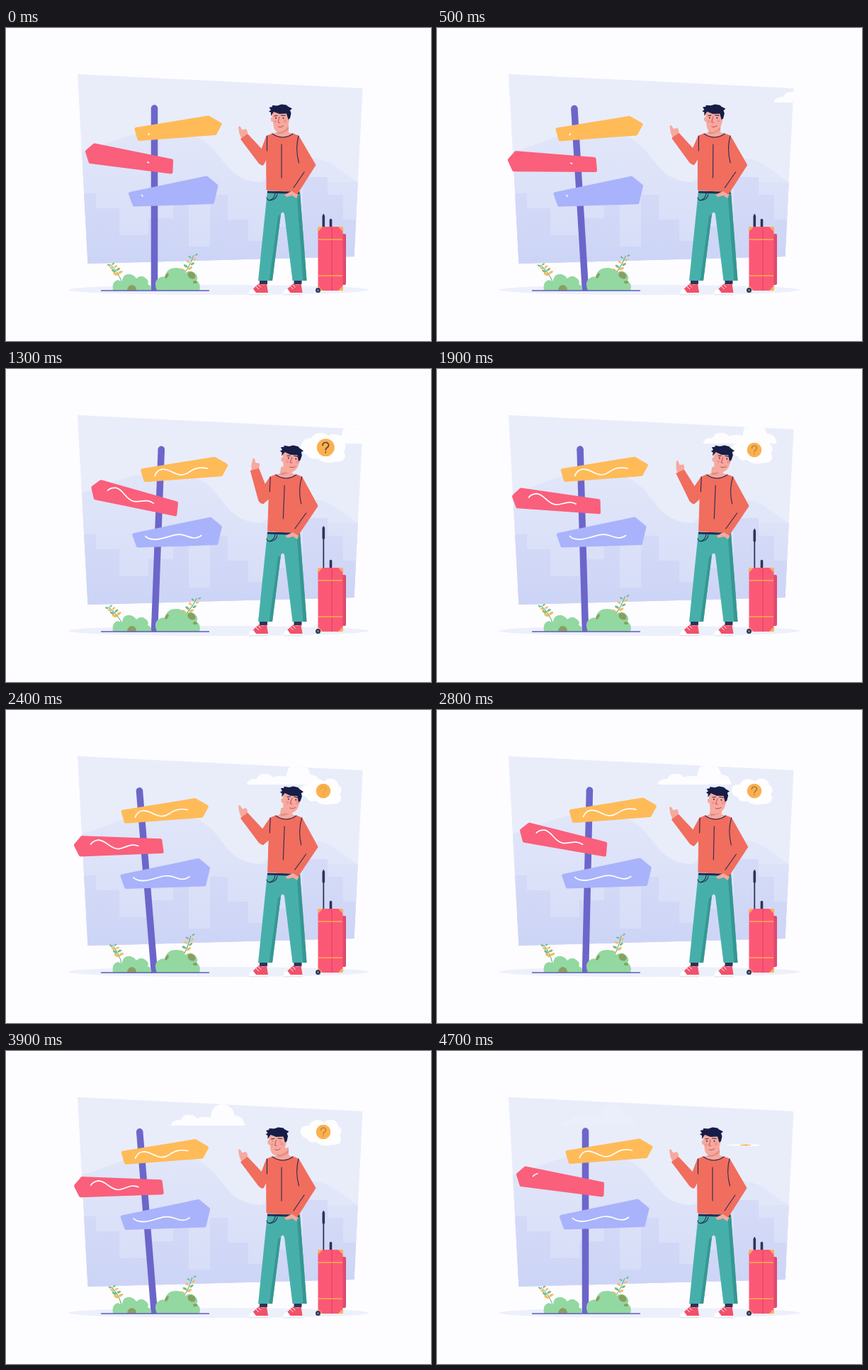
Animation of 600 by 441 pixels, one loop 4800 ms. Source, as an HTML page:

```html
<!DOCTYPE html>
<html lang="en">
<head>
<meta charset="utf-8">
<title>Traveller at a signpost</title>
<style>
  html, body { margin: 0; width: 100%; height: 100%; overflow: hidden; background: #fdfcff; }
  svg { display: block; width: 600px; height: 441px; }
  .line { fill: none; stroke: #252b54; stroke-width: 1.1; stroke-linecap: round; }
  .sign path:first-child { stroke-width: 5; stroke-linejoin: round; }
  .wave { fill: none; stroke: #fff; stroke-width: 1.7; }
  .stem { fill: none; stroke: #59a579; stroke-width: 1; }
  .skin { fill: #f6a99e; }
  .shirt { fill: #f16d5e; stroke: #f16d5e; stroke-linejoin: round; }
</style>
</head>
<body>
<svg viewBox="0 0 600 441">
  <defs>
    <clipPath id="frame"><path d="M101 65L503.500 85L491.500 322L115.500 332Z"/></clipPath>
    <linearGradient id="hill" x1="0" y1="0" x2="0" y2="1">
      <stop stop-color="#e1e6f9"/><stop offset="1" stop-color="#d5dcf7"/>
    </linearGradient>
    <linearGradient id="town" x1="0" y1="0" x2="0" y2="1">
      <stop stop-color="#d5dbf7"/><stop offset="1" stop-color="#ccd4f6"/>
    </linearGradient>
  </defs>

  <g clip-path="url(#frame)">
    <path fill="#e9edfa" d="M90 50H520V340H90Z"/>
    <path fill="#e1e6f9" d="M360 217C385 200 405 182 436 184C462 186 477 207 505 222V340H340Z"/>
    <path fill="url(#hill)" d="M100 176C145 166 160 150 205 147C250 143 274 150 294 172C313 194 323 217 362 217H505V340H100Z"/>
    <path fill="url(#town)" d="M100 233H127V254H160V292H201V268H236V248H258V308H288V235H313V270H342V300H371V280H400V290H419V210H454V235H476V270H505V340H100Z"/>
    <path id="cloud" fill="#fdfdff" d="M0 105Q1 97 14 97Q17 89 26 90Q34 90 37 95Q46 91 56 94Q57 76 72 75Q86 75 90 91Q103 92 104 105Z"/>
  </g>

  <ellipse cx="300" cy="369" rx="212" ry="7" fill="#ecf0fb"/>

  <g id="plantL"><path class="stem" d="M163 357Q158 343 147 333"/><g></g></g>
  <g id="plantR"><path class="stem" d="M245 353Q257 342 265 320"/><g></g></g>

  <g id="post">
    <path d="M209.500 113V370" stroke="#6c66ca" stroke-width="9.500"/>
    <circle cx="209.500" cy="113" r="4.750" fill="#6c66ca"/>
    <g class="sign">
      <path fill="#ffbb58" stroke="#ffbb58" d="M184 142.500L285.500 126L302 135.500L295 148.500L188 156.500Z"/>
      <path class="wave" pathLength="100" d="M201 151C205 140 214 139 224 144S240 151 248 146S262 137 276 140"/>
    </g>
    <g class="sign">
      <path fill="#fa5f7b" stroke="#fa5f7b" d="M114.500 174L125 165L233.500 187L233 203L119 188.500Z"/>
      <path class="wave" pathLength="100" d="M202 190C191 183 183 190 173 189C161 187 158 174 147 172Q139 172 135 177"/>
    </g>
    <g class="sign">
      <path fill="#a9b3fb" stroke="#a9b3fb" d="M175.500 233.500L283 211L297 222.500L291.500 245.500L181 249Z"/>
      <path class="wave" pathLength="100" d="M191 235C198 243 211 240 221 237S239 231 249 235S265 239 271 234"/>
    </g>
  </g>

  <path fill="#92d8a0" d="M151 370Q149 357 158 355Q163 357 164 357Q165 345 176 347Q182 349 184 353Q191 346 199 354Q202 357 200 361Q206 363 205 370Z"/>
  <path fill="#92d8a0" d="M213 370Q208 358 215 353Q220 349 224 351Q227 337 242 338Q251 339 253 345Q262 339 268 347Q272 351 269 356Q276 361 273 370Z"/>
  <g fill="#899f62">
    <path d="M171 370Q172 362 178 362Q184 363 184 370Z"/>
    <ellipse cx="227" cy="349" rx="2" ry="4" transform="rotate(30 227 349)"/>
    <ellipse cx="262" cy="348.500" rx="6" ry="4.500" transform="rotate(35 262 348.500)"/>
    <ellipse cx="267" cy="358" rx="3" ry="2"/>
  </g>
  <path d="M134 370H287" stroke="#605bb8" stroke-width="1.500"/>

  <g id="thought">
    <path fill="#fefeff" d="M-29 -1C-29 -8 -23 -9 -17 -9C-15 -18 0 -19 4 -13C9 -20 23 -18 24 -8C29 -7 30 1 26 5C32 13 24 20 15 18C8 21 -3 19 -7 14C-13 16 -19 14 -20 9C-25 8 -29 5 -29 -1Z"/>
    <g id="coin">
      <circle r="10.300" fill="#fbb04e"/>
      <path id="mark" d="M-3.500 -2.500C-3.500 -7 3.800 -7 3.500 -2.500C3.300 .3 0 0 0 2.800M0 5.300V5.700" fill="none" stroke="#5a3f38" stroke-width="1.400" stroke-linecap="round"/>
    </g>
  </g>

  <g>
    <g stroke="#2d3458" stroke-linecap="round">
      <path id="stem" stroke-width="1.800"/><path id="grip" stroke-width="3.600"/>
      <path stroke-width="3.600" d="M458.500 270.500V277M458.500 277V282"/>
    </g>
    <rect x="472" y="290" width="8" height="72" rx="2" fill="#df4a70"/>
    <rect x="440.500" y="280" width="35" height="90" rx="3" fill="#fb5876"/>
    <path d="M460 281V370" stroke="#e0456b" stroke-width="1.300"/>
    <path d="M441 298H475M441 349H475" stroke="#f9ae50" stroke-width="1.700"/>
    <path fill="#fab04f" d="M440.500 280H447L440.500 287ZM475.500 280H469L475.500 287ZM440.500 370H447L440.500 363ZM475.500 370H469L475.500 363Z"/>
    <circle cx="440.500" cy="369.500" r="3.500" fill="#31375a"/>
    <circle cx="440.500" cy="369.500" r="1.200" fill="#8b90ad"/>
  </g>

  <g>
    <g id="shoe">
      <path fill="#2d3458" d="M358 355H369V361H358Z"/>
      <path fill="#f0516b" d="M345 371L357 360Q363 363 368 360L370 373L345 374Z"/>
      <path fill="#fff" d="M343 374Q343 369 349 367.500L353 373H370V375.500H343Z"/>
      <path stroke="#fff" d="M353 364L357 368M356 361.500L360 365.500"/>
      <path stroke="#d9dcea" d="M343 375.800H370"/>
    </g>
    <use href="#shoe" x="48.500"/>
    <path fill="#47afaa" d="M369 230H415L424.500 356H404.500L393 262Q391 257 388 262L376 356H356Z"/>
    <path fill="#369792" d="M388 262L376 356H371.500L384 265ZM411 240L415 232L424.500 356H419.500Z"/>
    <path class="line" d="M368 239Q369 244 374 242Q379 240 380 233M372 243Q382 242 383 234"/>
    <path d="M369 231L414 232.500" stroke="#252b54" stroke-width="3"/>
  </g>

  <path id="upperArm" class="shirt"/>
  <g id="torso">
    <path class="skin" d="M383 138L382 147L376 149Q391 160 405 149L399 147V136Z"/>
    <path fill="#e58f88" d="M383 146Q391 147 399 139V143Q391 150 383 149Z"/>
    <path class="skin" d="M393 235L405 229L412 234L410 240L404 236L396 238Z"/>
    <path class="shirt" d="M376 149Q390 159 405 149L413 152L437 193L411 234L403 229L413.500 208V229Q391 231 368 228L367.500 158L368.500 152Z"/>
    <path class="line" d="M389 164V211M368.500 152V173M413 152Q408 170 413.500 190M421 203L406 225"/>
    <path class="line" d="M376 149Q391 159 405 149"/>
  </g>
  <g id="foreArm">
    <path class="skin" d="M333 157L329.500 149L328 140Q328.500 137 331 139.500L333.500 143.500L339 142Q342 146 340.500 152Z"/>
    <path class="shirt" d="M331.500 156.500L341 149.500L364 174Q368 190 362 193.500L357.500 191Z"/>
  </g>

  <g id="head">
    <path class="skin" d="M375 118L376 126Q373 125 374 130Q375 133 377 132L378 140Q380 147 386 147Q394 145 398 138L400.500 128V117Z"/>
    <path fill="#161d46" d="M374 124L374 119L371 117.500L374 115.500L371.500 112L376 111L376 109L383 109.500L389 107.500L396 108.500L398 110.500L404 113.500L401 116L402.500 120L401 127L398.500 129L396 120.500L386 121L378 118Z"/>
    <g id="face">
      <path class="line" stroke-width=".8" d="M379 124L383 123.500M388.500 123L394 123.500"/>
      <path d="M386 125L384 133L387 133.500M384 139Q388 141 392 137.500" fill="none" stroke="#d2455f"/>
      <g fill="#ef7d7c" opacity=".5"><circle cx="380" cy="132" r="1.800"/><circle cx="394" cy="131" r="2.200"/></g>
      <g id="eyes" fill="#252b54"><circle cx="381" cy="127" r="1"/><circle cx="391.500" cy="127" r="1"/></g>
    </g>
  </g>
</svg>
<script>
const LOOP = 4800, STEP = 100;
const el = id => document.getElementById(id);
const set = (id, name, value) => el(id).setAttribute(name, value);
const move = (id, value) => set(id, 'transform', value);

const part = (t, from, to) => Math.min(1, Math.max(0, (t - from) / (to - from)));
const ease = (t, from, to) => {
  const u = part(t, from, to);
  return u * u * (3 - 2 * u);
};
// Fast start, then a tenth too far before settling.
const pop = (t, from, to) => {
  const v = part(t, from, to) - 1;
  return 1 + 2.7 * v ** 3 + 1.7 * v * v;
};

// Leaves alternate along each stem.
for (const id of ['plantL', 'plantR']) {
  const stem = el(id).firstElementChild, length = stem.getTotalLength();
  let leaves = '';
  for (let i = 0; i < 8; i++) {
    const p = stem.getPointAtLength(length * (.36 + .09 * i));
    const side = i % 2 ? 1 : -1;
    const color = i % 4 < 2 ? '#f8bb55' : '#72bd88';
    const r = 3.6 - .2 * i;
    leaves += `<ellipse rx="${r}" ry="${r * .5}" fill="${color}" transform="translate(${p.x + side * 4} ${p.y - 1}) rotate(${-side * 30})"/>`;
  }
  el(id).lastElementChild.innerHTML = leaves;
}

// Top board and bottom board stay level, the middle one swings further.
const signs = [...document.querySelectorAll('.sign')];
const hinges = [140, 190, 230], swing = [-1, 1, -1];

function drawPost(t) {
  const p = t % 1600;
  const shift = -21.5 * ease(p, 0, 750) + 31.5 * ease(p, 850, 1300) - 10 * ease(p, 1300, 1500);
  const angle = shift * .2187;
  move('post', `rotate(${angle} 209.5 370)`);
  const end = 4 + 96 * ease(t, 750, 1300);
  signs.forEach((sign, i) => {
    sign.setAttribute('transform', `rotate(${angle * swing[i]} 209.5 ${hinges[i]})`);
    const start = i === 1 ? 92 * ease(t, 4350, 4750) : 0;
    sign.lastElementChild.setAttribute('stroke-dasharray', `0 ${start} ${end - start} 200`);
  });
}

function drawScene(t) {
  move('cloud', `translate(${511 - t * .0713})`);
  set('cloud', 'opacity', 1 - .9 * ease(t, 4150, 4650));
  const bend = 8 * (ease(t, 0, 1300) - 2 * ease(t, 1300, 2600) + ease(t, 3100, 4600));
  move('plantL', `rotate(${-bend} 163 357)`);
  move('plantR', `rotate(${bend} 245 353)`);

  const top = 263 - 37 * (pop(t, 880, 1600) - ease(t, 4300, 4650));
  set('stem', 'd', `M448.300 ${top}V282`);
  set('grip', 'd', `M448.300 ${top + 2}V${Math.min(280, top + 16)}`);
}

function drawThought(t) {
  const show = pop(t, 780, 1680), hide = ease(t, 4400, 4760);
  move('thought', `translate(${415 + 30 * show - 13 * hide} ${148 - 34 * show + 20 * hide})
    scale(${show * (1 - .2 * hide)} ${show * (1 - hide)})`);
  move('coin', `translate(3) scale(${pop(t, 950, 1550)})`);
  set('mark', 'opacity', .55 + .45 * Math.cos((t - 1300) * Math.PI / 1000));
}

function drawMan(t) {
  const lean = ease(t, 350, 850) - ease(t, 2500, 3150);
  const tilt = ease(t, 3350, 3750) - ease(t, 4050, 4450);
  const skew = -.04 * lean;
  move('torso', `matrix(1 0 ${skew} 1 ${1.5 * lean - 232 * skew} 0)`);
  move('head', `translate(${12.5 * lean - 4.5 * tilt} 0) rotate(${6 * lean} 390 148)`);
  move('face', `translate(${3 * lean} ${-lean})`);
  const open = 1 - .8 * (t >= 3800 && t <= 3900);
  move('eyes', `translate(0 ${127 * (1 - open)}) scale(1 ${open})`);

  const lift = 22 * (ease(t, 400, 1350) - ease(t, 1350, 2450));
  move('foreArm', `translate(0 ${-4 * lean}) rotate(${lift} 362 188)`);
  set('upperArm', 'd', `M${368 + 5 * lean} 152L360 ${173 - 2 * lean}L358 ${190 - 3 * lean}L363 ${193 - 3 * lean}L${369 + 3 * lean} 182Z`);
}

const begin = performance.now();
function frame() {
  const now = performance.now() - begin + 10;
  const t = Math.floor(now / STEP) * STEP % LOOP;
  drawPost(t);
  drawScene(t);
  drawThought(t);
  drawMan(t);
  requestAnimationFrame(frame);
}
frame();
</script>
</body>
</html>
```
